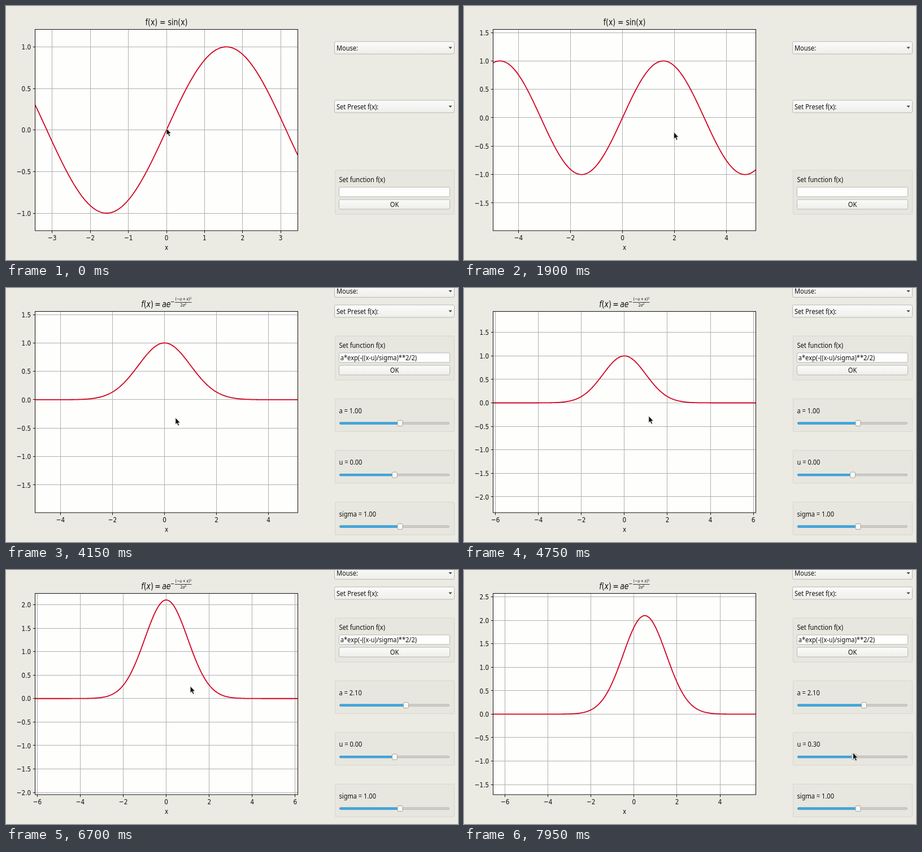
An HTML page that plays this animation: 800x450 px, repeating every 8000 ms.

```html
<!DOCTYPE html>
<html lang="en">
<head>
<meta charset="utf-8">
<title>Function plotter</title>
<style>
  html, body { margin: 0; width: 100%; height: 100%; overflow: hidden; background: #ebeae3; }
  svg { display: block; width: 800px; height: 450px; }
  text { fill: #111; white-space: pre; font-kerning: none; }
  .plot { font-family: "DejaVu Sans", sans-serif; }
  .ui { font-family: "Noto Sans", "Open Sans", sans-serif; }
  .it { font-style: italic; }
</style>
</head>
<body>
<svg id="stage" viewBox="0 0 800 450">
  <defs>
    <linearGradient id="raised" x1="0" y1="0" x2="0" y2="1">
      <stop offset="0" stop-color="#fbfbfa"/><stop offset="1" stop-color="#eeeeea"/>
    </linearGradient>
    <clipPath id="area"><rect x="51.5" y="41.5" width="465" height="356.5"/></clipPath>
  </defs>
  <g id="graph"></g>
  <g id="panel"></g>
  <path id="mouse" d="M0 0V11.6L2.6 9.3 4.6 13.9 6.5 13 4.6 8.7 8 8.4Z" fill="#111" stroke="#d8d8d4" stroke-width=".7"/>
</svg>
<script>
const LOOP = 8000, STEP = 50;
const SQUEEZE = 0.82; // the whole screen has narrow pixels
const BOX = { l: 51.5, t: 41.5, r: 516.5, b: 398 };
const UNIT = { x: 67.4, y: 147.3 };
const SWAP = 4050; // the new function appears
const KNOB = { zero: 688, unit: 9.5 };
const FORMULA = 'a*exp(-((x-u)/sigma)**2/2)';
const $ = id => document.getElementById(id);
const tau = 2 * Math.PI;

const part = (t, t0, t1) => Math.min(1, Math.max(0, (t - t0) / (t1 - t0)));
const ease = p => p * p * (3 - 2 * p);

// slider values: a swings down, overshoots and settles; u goes out and back
const amp = t => {
  const p = part(t, 5150, 5950);
  return 1 + 1.1 * p - 3.3 * (1 - p) * Math.sin(tau * p);
};
const shift = t => 1.25 * Math.sin(Math.PI * part(t, 7300, 8000));
const tenth = v => Math.round(v * 10) / 10 || 0;

// gestures: each one changes the state s {x, y: mouse, ox, oy: origin, k: zoom}
const move = (t0, t1, x, y) => (s, t) => {
  const p = ease(part(t, t0, t1));
  s.x += (x - s.x) * p;
  s.y += (y - s.y) * p;
};
const drag = (t0, t1, dx, dy, swing = 0) => (s, t) => {
  const p = part(t, t0, t1), w = swing * Math.sin(tau * p);
  const mx = dx * p + w, my = dy * p + w * 0.8;
  s.x += mx; s.ox += mx;
  s.y += my; s.oy += my;
};
const zoomOut = (t0, gap, steps) => (s, t) => {
  const n = t < t0 ? 0 : Math.min(steps, 1 + Math.floor((t - t0) / gap)), k = 1.1 ** -n;
  s.ox = s.x + (s.ox - s.x) * k;
  s.oy = s.y + (s.oy - s.y) * k;
  s.k *= k;
};
const slide = (t0, t1, value) => (s, t) => {
  s.x += KNOB.unit * (value(Math.min(t1, Math.max(t0, t))) - value(t0));
};

const SCRIPT = [
  zoomOut(100, 100, 4),
  drag(450, 850, -27, -13.4, -25),
  move(850, 900, 274, 203),
  drag(950, 1600, 23.5, -7.5, 30),
  move(1750, 2250, 640, 326),
  move(2350, 2500, 790, 165),
  move(2900, 3150, 656, 345),
  move(3400, 3650, 200, 160),
  move(3650, 3850, 300, 230),
  zoomOut(4350, 150, 2),
  move(4600, 4700, 327, 227),
  drag(4750, 4920, 23.5, 18.2),
  move(4920, 5100, 697.5, 239),
  slide(5150, 5950, amp),
  move(6000, 6200, 350, 200),
  drag(6250, 6950, -6.5, 33.7, 25),
  move(6950, 7200, 663, 337),
  move(7200, 7300, 686, 324),
  slide(7300, 8000, shift)
];

function stateAt(t) {
  const s = { x: 284, y: 217, ox: 284, oy: 219.7, k: 1 };
  SCRIPT.forEach(act => act(s, t));
  return s;
}

function text(x, y, str, size, cls, anchor = 'start') {
  return `<text class="${cls}" transform="translate(${x} ${y}) scale(${SQUEEZE} 1)" ` +
    `font-size="${size}" text-anchor="${anchor}">${str}</text>`;
}
const label = (x, y, str, anchor) => text(x, y, str, 13.5, 'ui', anchor);
const tick = (x, y, str, anchor) => text(x, y, str, 12.8, 'plot', anchor);
const rect = (x, y, w, h, fill, stroke, r = 0) =>
  `<rect x="${x}" y="${y}" width="${w}" height="${h}" rx="${r}" fill="${fill}" stroke="${stroke}"/>`;
const num = (v, d) => v.toFixed(d).replace('-', '\u2212');
const it = s => `<tspan class="it">${s}</tspan>`;
const squared = '<tspan dy="-2.4" font-size="5.2">2</tspan>';

function formulaTitle() {
  return text(239.3, 33.5, `${it('f')}(${it('x')})\u2009=\u2009${it('ae')}`, 15.2, 'plot') +
    text(291, 28, '\u2212', 10.7, 'plot') +
    text(313.8, 22.2, `(\u2212${it('u')}\u2009+\u2009${it('x')})${squared}`, 7.8, 'plot', 'middle') +
    '<path d="M299 25.5H328.5" stroke="#111" stroke-width=".8"/>' +
    text(313.8, 32.8, `2${it('\u03c3')}${squared}`, 7.8, 'plot', 'middle');
}

function drawGraph(t, { ox, oy, k }) {
  const sx = UNIT.x * k, sy = UNIT.y * k;
  const px = x => ox + x * sx, py = y => oy - y * sy;
  const snap = v => Math.round(v - 0.5) + 0.5;
  const bell = t >= SWAP;
  const a = tenth(amp(t)), u = tenth(shift(t - STEP)); // the curve trails the u slider
  const f = x => bell ? a * Math.exp(-((x - u) ** 2) / 2) : Math.sin(x);

  let grid = '', ticks = '', out = '', line = '';
  const dx = (BOX.r - BOX.l) / sx > 9 ? 2 : 1;
  for (let i = Math.ceil((BOX.l - ox) / sx / dx); px(i * dx) <= BOX.r; i++) {
    const x = px(i * dx);
    grid += `M${snap(x)} ${BOX.t}V${BOX.b}`;
    ticks += `M${snap(x)} ${BOX.b}v4.2`;
    out += tick(x, 415.4, num(i * dx, 0), 'middle');
  }
  for (let i = Math.ceil((oy - BOX.b) / sy / 0.5); py(i * 0.5) >= BOX.t; i++) {
    const y = py(i * 0.5);
    grid += `M${BOX.l} ${snap(y)}H${BOX.r}`;
    ticks += `M${BOX.l} ${snap(y)}h-3.6`;
    out += tick(44.2, y + 4.7, num(i * 0.5, 1), 'end');
  }
  for (let x = BOX.l; x <= BOX.r; x += 1.5)
    line += `${line ? 'L' : 'M'}${x} ${py(f((x - ox) / sx)).toFixed(2)}`;

  const frameBox = (fill, stroke) => rect(BOX.l, BOX.t, BOX.r - BOX.l, BOX.b - BOX.t, fill, stroke);
  $('graph').innerHTML = frameBox('#fefefd', 'none') +
    `<path d="${grid}" stroke="#b0b0b0"/>` +
    `<path d="${line}" fill="none" stroke="#d0021f" stroke-width="1.8" clip-path="url(#area)"/>` +
    `<path d="${ticks}" stroke="#111"/>` + frameBox('none', '#111') + out +
    tick(284, 431.5, 'x', 'middle') +
    (bell ? formulaTitle() : text(284, 34, 'f(x) = sin(x)', 15.2, 'plot', 'middle'));
}

function combo(y, str) {
  return rect(581.5, y - 11, 212, 22, 'url(#raised)', '#b9b8b2', 2.5) +
    label(585, y + 4.7, str) +
    `<path d="M783.3 ${y - 1.6}h6.4l-3.2 3.6z" fill="#444"/>`;
}
const group = (y, h) => rect(582.5, y, 211, h, '#e7e6df', '#d6d5ce', 1);

function sliderBox(row, name, value) {
  const y = 196.3 + 91.5 * row, cy = y + 43.3, x = KNOB.zero + KNOB.unit * value;
  return group(y, 58) + label(589.5, y + 25.3, `${name} = ${value.toFixed(2)}`) +
    rect(590.5, cy - 1.6, 194, 3.2, '#d3d2cc', '#b3b2ad', 1.6) +
    rect(590.5, cy - 1.6, x - 590.5, 3.2, '#3daee9', '#3292c6', 1.6) +
    rect(x - 4.5, cy - 5, 9, 10, '#f8f8f6', '#a3a29d', 2);
}

function drawPanel(t) {
  const low = t < SWAP, y = low ? 291 : 85;
  const focus = t >= 2300 && t < 3300;
  const typed = FORMULA.slice(0, Math.round(part(t, 2500, 2950) * FORMULA.length));
  let out = combo(low ? 74 : 5.5, 'Mouse:') + combo(low ? 178 : 41, 'Set Preset f(x):') +
    group(y, 78) + label(589.5, y + 21.3, 'Set function f(x)') +
    rect(589.5, y + 30, 196, 16.8, '#fefefe', focus ? '#3d9ccb' : '#b9b8b2', 2) +
    label(591.7, y + 43.1, typed) +
    rect(589.5, y + 52, 196, 17, 'url(#raised)', '#b9b8b2', 2.5) +
    label(687.5, y + 65.4, 'OK', 'middle');
  if (!low)
    out += sliderBox(0, 'a', tenth(amp(t))) + sliderBox(1, 'u', tenth(shift(t))) + sliderBox(2, 'sigma', 1);
  $('panel').innerHTML = out;
}

let shown = -1;
function frame(now) {
  const t = Math.floor(now % LOOP / STEP) * STEP;
  if (t !== shown) {
    shown = t;
    const s = stateAt(t);
    drawGraph(t, s);
    drawPanel(t);
    $('mouse').setAttribute('transform', `translate(${s.x} ${s.y})`);
  }
  requestAnimationFrame(frame);
}
frame(performance.now());
</script>
</body>
</html>
```
